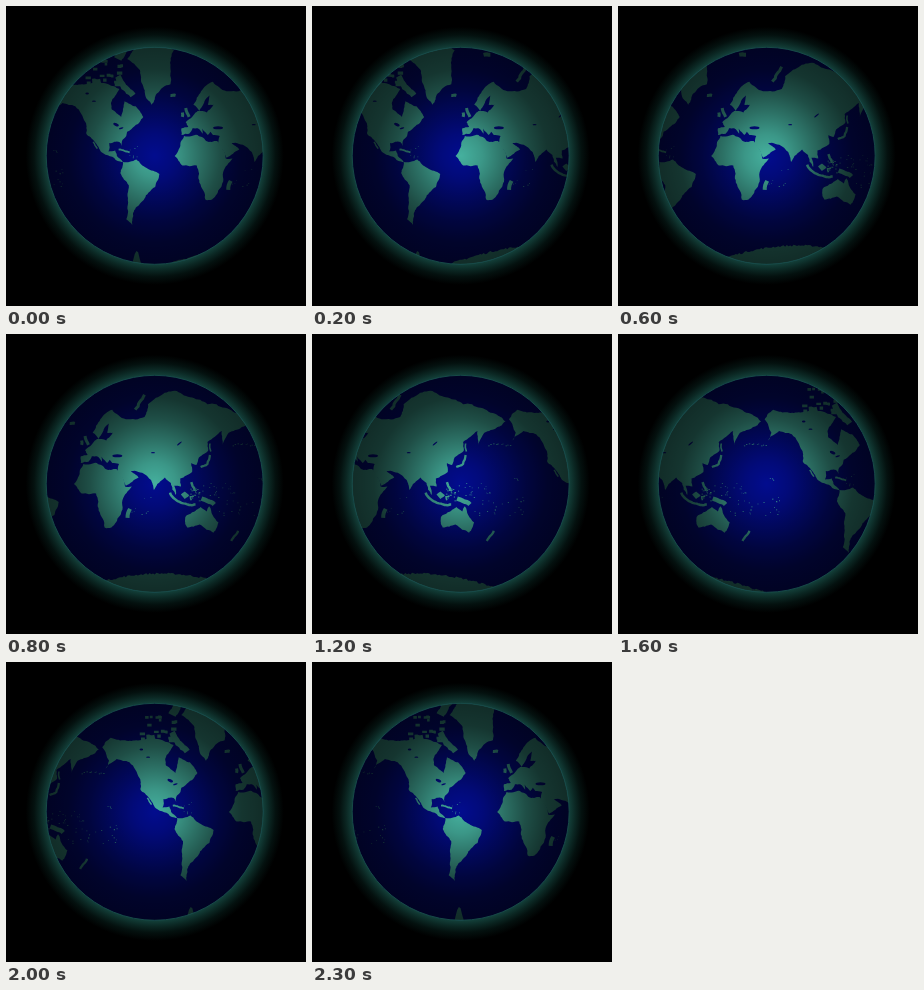
These frames come from a looping animation (300x300 px, 2.4 s). An HTML page with a canvas:

```html
<!DOCTYPE html>
<html lang="en">
<head>
<meta charset="utf-8">
<title>Turning globe</title>
<style>
html, body { margin: 0; width: 100%; height: 100%; overflow: hidden; background: #000; }
canvas { display: block; }
</style>
</head>
<body>
<canvas id="stage" width="300" height="300"></canvas>
<script>
const ctx = document.getElementById('stage').getContext('2d');
const CX = 148.7, CY = 149.8, R = 108.5;
const MAP_W = 306, DEG = MAP_W / 360, EQUATOR = 162.8;
const STEP_MS = 100, STEPS = 24, STEP_PX = 12.59;
const START_LON = -39;
const SEA = '#020c8e', LAND = '#45b09e';

let seed = 7;
const random = () => (seed = seed * 16807 % 2147483647) / 2147483647;

// Mercator projection; x = 0 lies on the starting meridian
const project = (lon, lat) => [
  (lon - START_LON) * DEG,
  EQUATOR - MAP_W / (2 * Math.PI) * Math.log(Math.tan(Math.PI / 4 + lat * Math.PI / 360))
];

// Breaks a straight line into a ragged coast by midpoint displacement
function coast(path, a, b) {
  const dx = b[0] - a[0], dy = b[1] - a[1];
  if (Math.hypot(dx, dy) < 2.5) return path.lineTo(...b);
  const push = (random() - .5) * .2;
  const mid = [(a[0] + b[0]) / 2 - dy * push, (a[1] + b[1]) / 2 + dx * push];
  coast(path, a, mid);
  coast(path, mid, b);
}

// Key points are written "lon lat, lon lat, ..."
function trace(outline, closed) {
  const points = outline.split(',').map(p => project(...p.trim().split(' ').map(Number)));
  const path = new Path2D();
  path.moveTo(...points[0]);
  for (let i = 1; i < points.length; i++) coast(path, points[i - 1], points[i]);
  if (closed) coast(path, points.at(-1), points[0]);
  return path;
}

const lands = [], ridges = [], lakes = [];
const land = outline => lands.push(trace(outline, true));
const ridge = (width, outline) => ridges.push({ width, path: trace(outline) });

function lake(lon, lat, rx, ry, tilt = 0) {
  const path = new Path2D();
  path.ellipse(...project(lon, lat), rx, ry, tilt, 0, 2 * Math.PI);
  lakes.push(path);
}

function islets(count, west, east, south, north, size = 1) {
  const path = new Path2D();
  for (let i = 0; i < count; i++) {
    const lon = west + random() * (east - west), lat = south + random() * (north - south);
    path.rect(...project(lon, lat), size * (.6 + random()), size * (.6 + random() * .4));
  }
  lands.push(path);
}

// North America, Greenland, South America
land('-166 67,-156 71,-126 70,-95 70,-82 68,-92 61,-91 57,-80 52,-76 62,-63 59,-54 52,-64 45,-73 40,-74 36,-79 31,-79 26,-82 30,-94 29,-95 20,-87 21,-85 15,-78 8,-84 9,-103 19,-111 30,-121 38,-122 48,-134 59,-149 61,-162 55,-158 60');
land('-73 78,-58 75,-52 66,-44 60,-38 66,-22 70,-18 80,-45 84');
land('-78 8,-62 11,-50 1,-35 -6,-40 -21,-48 -27,-58 -38,-66 -46,-67 -55,-74 -51,-71 -19,-81 -5');
// Africa, Eurasia, Australia
land('-6 36,10 37,20 31,33 31,43 12,51 12,40 -4,40 -15,34 -25,27 -34,19 -34,12 -16,9 4,-8 4,-17 15,-10 30');
land('-9 37,0 38,4 43,10 43,16 38,14 45,22 37,25 40,28 37,36 36,34 29,44 13,59 22,50 29,67 25,73 20,77 8,81 15,90 22,97 16,103 2,101 13,109 12,108 21,122 28,121 37,127 35,130 42,141 48,140 54,157 61,158 52,165 60,180 63,190 66,180 69,140 73,104 77,70 73,66 68,44 67,28 71,14 67,5 60,12 56,18 62,24 65,22 60,29 60,21 55,10 56,2 51,-4 48,-1 44,-9 43');
land('114 -23,116 -34,131 -31,139 -36,147 -39,153 -29,142 -11,139 -17,132 -12,122 -18');

// Antarctica: a broad wave with the peninsula as a bump
const ice = new Path2D();
for (let lon = -180; lon <= 180; lon += 2) {
  const lat = -72.5 + 5.5 * Math.cos((lon - 85) * Math.PI / 180) + 8 * Math.exp(-(((lon + 62) / 5) ** 2));
  ice.lineTo(...project(lon, lat + random() * .8));
}
ice.lineTo(...project(180, -83));
ice.lineTo(...project(-180, -83));
lands.push(ice);

// Long islands and peninsulas
ridge(6, '-66 65,-84 73');
ridge(8, '-70 82,-84 78');
ridge(6, '-114 71,-104 71');
ridge(1.8, '-83 22,-70 19');
ridge(1.5, '-113 30,-108 23');
ridge(3, '-22 65,-16 65');
ridge(3, '0 52,-4 58');
ridge(3, '-8 52,-8 55');
ridge(4, '16 79,24 79');
ridge(3, '55 71,66 76');
ridge(4, '49 -14,46 -24');
ridge(2.3, '132 33,140 36,143 44');
ridge(1.6, '144 47,143 53');
ridge(2.5, '121 17,125 8');
ridge(2.5, '96 5,105 -5,114 -8,126 -9');
ridge(6, '111 0,116 4');
ridge(1.6, '121 -4,120 0,124 1');
ridge(4.5, '133 -2,140 -5,148 -9');
ridge(2.3, '176 -37,168 -46');

// Inland seas
lake(34, 43.4, 5, 1.6);
lake(107, 53, 3, .7, -.7);
lake(76, 46, 2, .6);
lake(-86, 46, 3, 1.4, .4);
lake(-80, 43, 2.4, .8, -.3);
lake(-112, 62, 2, .7);
lake(-120, 66, 1.8, 1);

// Scattered islands: Arctic, East Indies, Pacific, Indian Ocean, Caribbean, Aleutians
islets(24, -122, -80, 69, 78, 3.5);
islets(18, 118, 132, -7, 12, 1.3);
islets(20, 134, 172, 2, 17, .8);
islets(26, 152, 212, -22, 0, .9);
islets(8, 48, 74, -22, 4, .8);
islets(8, -72, -60, 11, 26, .8);
islets(4, 200, 205, 19, 22);
for (let lon = 168; lon < 196; lon += 3) islets(1, lon, lon + 2, 51, 53);

function radial(inner, outer, stops) {
  const g = ctx.createRadialGradient(CX, CY, inner, CX, CY, outer);
  stops.forEach(([at, color]) => g.addColorStop(at, color));
  return g;
}
const glow = radial(R, 129, [[0, '#13403a'], [.3, '#0b2723'], [.6, '#04110f'], [1, '#000']]);
const shade = radial(0, R, [0, .2, .4, .6, .8, 1].map(r => [r, `rgba(0,0,0,${.75 * Math.sin(r * Math.PI / 2) ** 1.4})`]));
const disc = new Path2D();
disc.arc(CX, CY, R, 0, 2 * Math.PI);

function paintMap() {
  ctx.fillStyle = ctx.strokeStyle = LAND;
  lands.forEach(path => ctx.fill(path));
  for (const { width, path } of ridges) {
    ctx.lineWidth = width;
    ctx.stroke(path);
  }
  ctx.fillStyle = SEA;
  lakes.forEach(path => ctx.fill(path));
}

function draw() {
  const step = Math.floor(performance.now() / STEP_MS) % STEPS;
  ctx.fillStyle = glow;
  ctx.fillRect(0, 0, 300, 300);

  ctx.save();
  ctx.clip(disc);
  ctx.fillStyle = SEA;
  ctx.fillRect(0, 0, 300, 300);
  for (let copy = -1; copy <= 2; copy++) {
    ctx.save();
    ctx.translate(150 - step * STEP_PX + copy * MAP_W, 0);
    paintMap();
    ctx.restore();
  }
  ctx.fillStyle = shade;
  ctx.fillRect(0, 0, 300, 300);
  ctx.restore();

  ctx.lineWidth = 1;
  ctx.strokeStyle = '#174a46';
  ctx.stroke(disc);
  requestAnimationFrame(draw);
}
draw();
</script>
</body>
</html>
```
